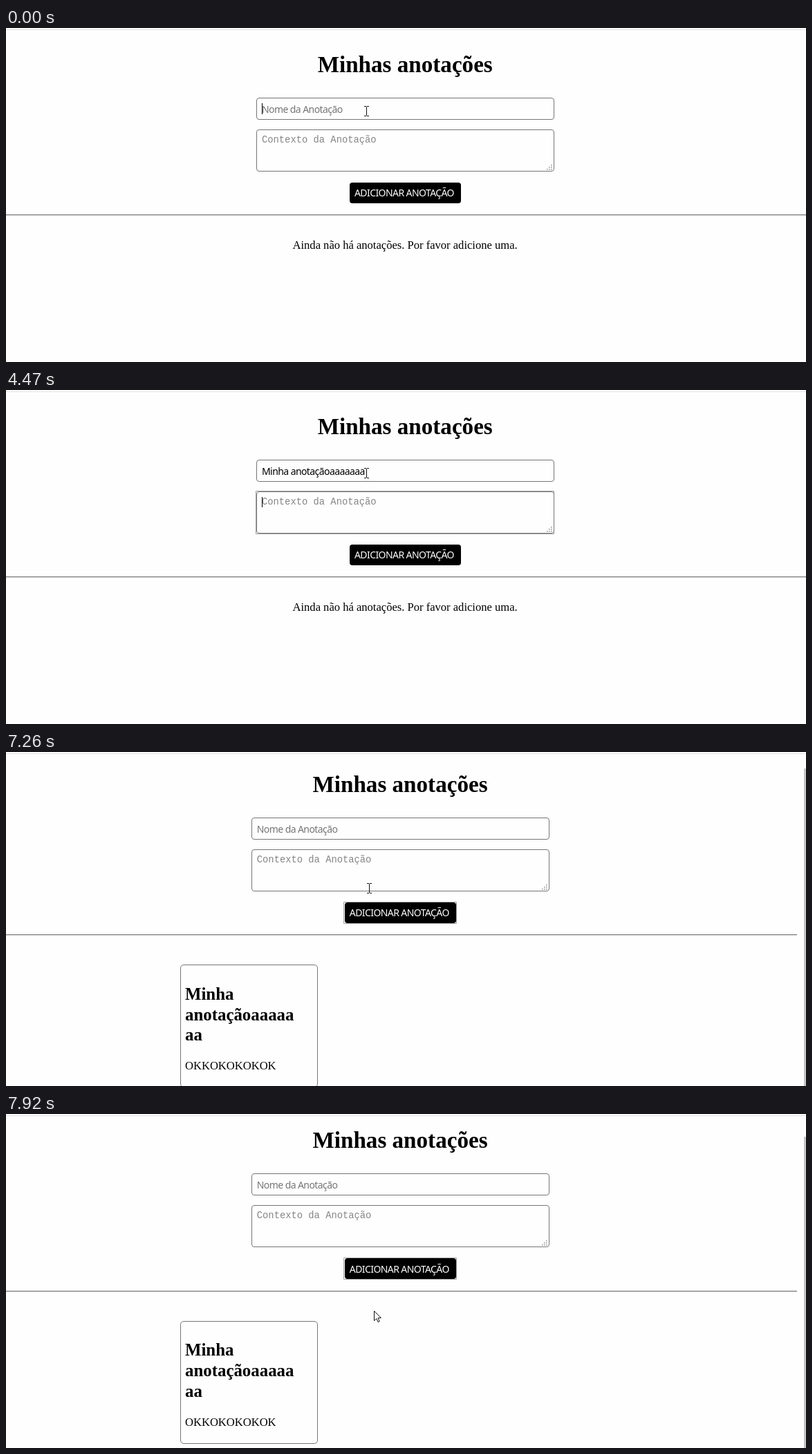
An HTML page with a canvas that plays this animation: 1157x484 px, repeating every 8 s.

```html
<!DOCTYPE html>
<html lang="pt-BR">
<head>
<meta charset="utf-8">
<title>Minhas anotações</title>
<style>
  html, body { margin: 0; width: 100%; height: 100%; overflow: hidden; background: #fefefe; }
  canvas { display: block; }
</style>
</head>
<body>
<canvas id="stage" width="1157" height="484"></canvas>
<script>
const ctx = document.getElementById('stage').getContext('2d');
const W = 1157, H = 484, LOOP = 8000;
const GRAY = '#767676', HINT = '#757575';
const SERIF = '"Liberation Serif", "Times New Roman", serif';
const SANS = '14px "Noto Sans", "Open Sans", sans-serif';
const MONO = '13.81px "Liberation Mono", "Courier New", monospace';
const TIGHT = -0.58;
const NAME = 'Minha anotaçãoaaaaaaa';
const BODY = 'OKKOKOKOKOK';

// Timelines: [start in ms, value...]
const nameKeys = [[0, 0], [560, 1], [690, 3], [810, 5], [940, 7], [1060, 9], [1190, 11],
  [1720, 12], [1850, 13], [1980, 14], [2240, 15], [2370, 16],
  [2500, 17], [2620, 18], [2750, 19], [3000, 20], [3120, 21]];
const bodyKeys = [[0, 0], [4860, 1], [4990, 2], [5130, 4], [5270, 6], [5400, 8], [5520, 10], [5670, 11]];
const focusKeys = [[0, 'name'], [3380, 'body'], [5790, 'button']];
const caretKeys = [[0, true], [1590, false], [1720, true], [3920, false], [4470, true]];
const scrollKeys = [[0, 0], [7260, 6], [7380, 11.2], [7530, 12.6], [7650, 13.7], [7920, 14.7]];
const mouseKeys = [[0, 'beam', 521, 120], [6860, 'arrow', 520, 134], [6990, 'beam', 523, 166],
  [7110, 'beam', 525, 197], [7650, 'arrow', 532, 285]];
const ADDED = 5920;

let dx = 0, scroll = 0;
const X = x => Math.round(x + dx);
const Y = y => Math.round(y - scroll);

function at(keys, t) {
  let hit = keys[0];
  for (const k of keys) if (k[0] <= t) hit = k;
  return hit;
}

function text(str, x, y, font, color, spacing = 0) {
  ctx.font = font;
  ctx.letterSpacing = spacing + 'px';
  ctx.fillStyle = color;
  ctx.fillText(str, x, Y(y));
  return ctx.measureText(str).width;
}

function box(x, y, w, h, r, color = GRAY) {
  ctx.beginPath();
  ctx.roundRect(x + 0.5, y + 0.5, w - 1, h - 1, r);
  ctx.strokeStyle = color;
  ctx.lineWidth = 1;
  ctx.stroke();
}

function rect(x, y, w, h, color) {
  ctx.fillStyle = color;
  ctx.fillRect(x, y, w, h);
}

function caret(x, y, h) {
  rect(Math.round(x), Y(y), 1, h, '#000');
}

function nameField(str, caretOn) {
  box(X(362), Y(101), 431, 32, 3.5);
  const w = text(str || 'Nome da Anotação', 370 + dx, 123, SANS, str ? '#000' : HINT, TIGHT);
  if (caretOn) caret(370 + (str ? w : 0), 109, 16);
}

function bodyField(str, focused, caretOn, marked) {
  const x = X(362), y = Y(147);
  if (focused) box(x - 1, y - 1, 432, 63, 0, '#a0a0a0');
  box(x, y, 431, 61, 3.5);
  const w = text(str || 'Contexto da Anotação', 370 + dx, 166, MONO, str ? '#222' : '#858585');
  if (caretOn) caret(370 + (str ? w : 0), 155, 15);
  if (marked) squiggle(370, 370 + w, 168.5);
  for (let row = 0; row < 3; row++)
    for (let col = 0; col <= row; col++)
      rect(x + 426 - col * 3, y + 51 + row * 3, 1.5, 1.5, '#8c8c8c');
}

function squiggle(from, to, y) {
  ctx.beginPath();
  for (let x = from, i = 0; x <= to; x += 2, i++) ctx.lineTo(x, y + (i % 2 ? 1 : -1));
  ctx.strokeStyle = '#f00';
  ctx.lineWidth = 1.2;
  ctx.stroke();
}

function button(focused) {
  ctx.beginPath();
  ctx.roundRect(X(497), Y(223.6), 161, 30, 4);
  ctx.fillStyle = '#000';
  ctx.fill();
  if (focused) {
    const left = X(495.6);
    box(left, Y(222.6), X(659.4) - left, 32, 0, '#a0a0a0');
  }
  text('ADICIONAR ANOTAÇÃO', 504 + dx, 244.4, SANS, '#fff', TIGHT);
}

function card() {
  box(252, Y(314.4), 199, 178, 4.5);
  ['Minha', 'anotaçãoaaaaa', 'aa'].forEach((line, i) =>
    text(line, 259, 365 + i * 29.6, 'bold 24.86px ' + SERIF, '#000'));
  text(BODY, 259, 466.4, '16.57px ' + SERIF, '#000');
}

function beam(x, y) {
  rect(x, y - 6, 1, 13, '#111');
  for (const end of [-7, 7]) {
    rect(x - 3, y + end, 3, 1, '#111');
    rect(x + 1, y + end, 3, 1, '#111');
  }
}

function arrow(x, y) {
  const pts = [[0, 0], [0, 14], [3.3, 11], [5.6, 16], [7.7, 15], [5.5, 10.2], [9.8, 10]];
  ctx.beginPath();
  for (const [px, py] of pts) ctx.lineTo(x + 0.5 + px, y + 0.5 + py);
  ctx.closePath();
  ctx.fillStyle = '#fff';
  ctx.fill();
  ctx.strokeStyle = '#111';
  ctx.lineWidth = 1;
  ctx.stroke();
}

function rule(width) {
  const y = Y(270.4);
  rect(0, y, width, 1, '#8a8a8a');
  rect(0, y + 1, width, 1, '#c4c4c4');
}

function draw(t) {
  const added = t >= ADDED;
  const focus = at(focusKeys, t)[1];
  const blink = at(caretKeys, t)[1];
  const [, pointer, mx, my] = at(mouseKeys, t);
  dx = added ? -7.2 : 0;
  scroll = at(scrollKeys, t)[1];

  rect(0, 0, W, H, '#fefefe');
  rect(0, 2, W, 1, '#e2e2e2');

  text('Minhas anotações', 450.7 + dx, 63.7, 'bold 33.14px ' + SERIF, '#000');
  nameField(added ? '' : NAME.slice(0, at(nameKeys, t)[1]), focus === 'name' && blink);
  bodyField(added ? '' : BODY.slice(0, at(bodyKeys, t)[1]),
    focus === 'body', focus === 'body' && blink, focus === 'button' && !added);
  button(focus === 'button');
  rule(added ? 1144 : W);

  if (added) {
    card();
    rect(1154, Math.round(18 + scroll * 1.04), 3, H, '#c4c4c4');
  } else {
    text('Ainda não há anotações. Por favor adicione uma.', 414.5, 320, '16.57px ' + SERIF, '#000');
  }
  (pointer === 'beam' ? beam : arrow)(mx, my);
}

const start = performance.now();
function tick() {
  draw((performance.now() - start) % LOOP);
  requestAnimationFrame(tick);
}
tick();
</script>
</body>
</html>
```
